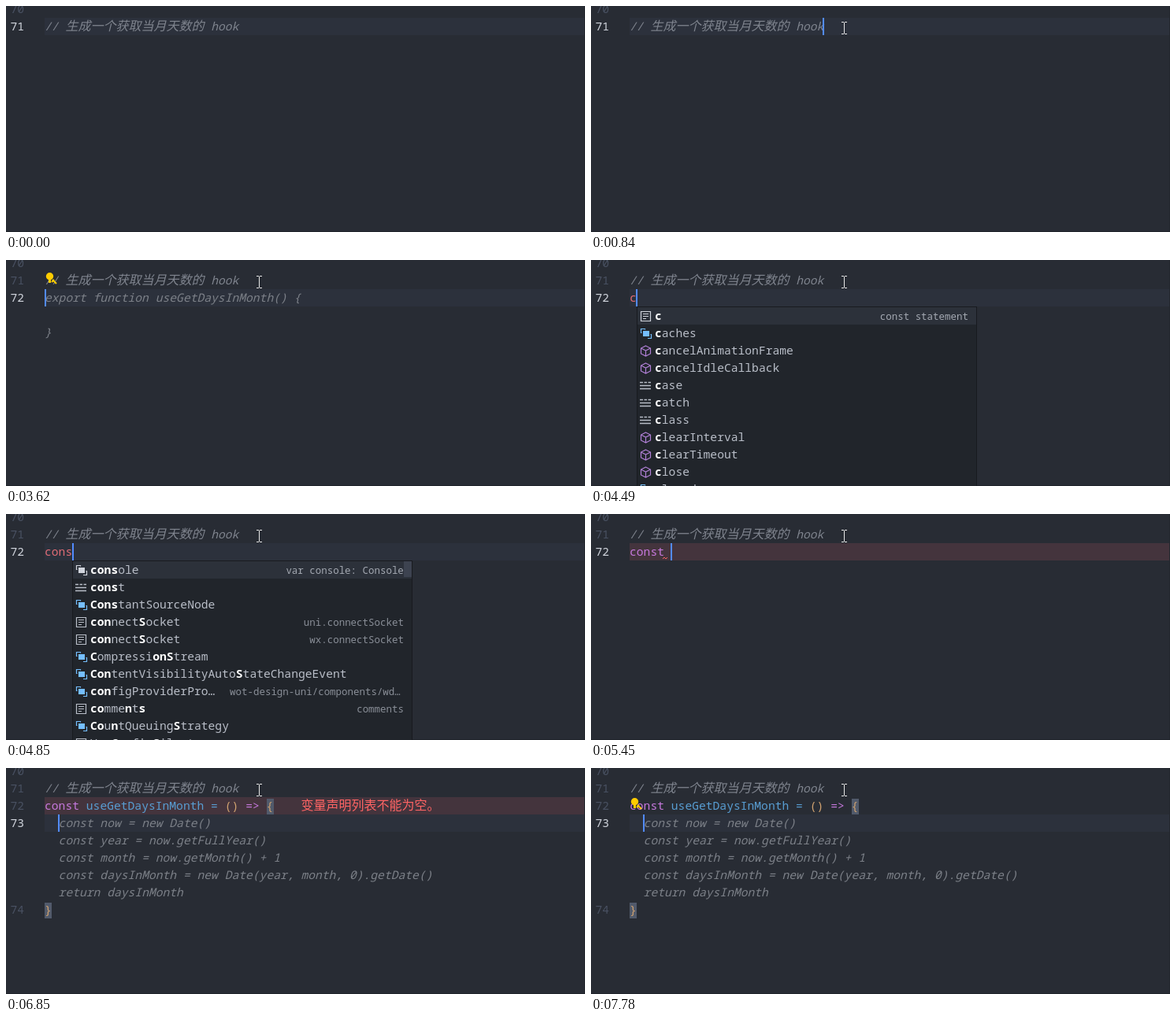
Write an HTML page with a canvas that moves like this. It is 735 by 287 pixels and loops after 8 s.

```html
<!DOCTYPE html>
<html lang="zh">
<head>
<meta charset="utf-8">
<style>
  html, body { margin: 0; width: 100%; height: 100%; overflow: hidden; background: #282c34; }
  canvas { display: block; }
</style>
</head>
<body>
<canvas id="stage" width="735" height="287"></canvas>
<script>
const ctx = document.getElementById('stage').getContext('2d');
const LOOP = 8000, LEFT = 49, ROW = 22, CHAR = 8.8, SIZE = CHAR / 0.6;
const COLOR = {
  bg: '#282c34', line: '#2c313c', error: '#44343d', message: '#ff6464', caret: '#528bff',
  gutter: '#495162', active: '#d0d4dc', comment: '#7f848e', ghost: '#7c8088', text: '#b9bec8',
  red: '#e06c75', purple: '#c678dd', blue: '#589dd2', gold: '#d0a270',
  bracket: '#515a6b', variable: '#75beff', method: '#b180d7', scrollbar: '#3d4350'
};

// Latest value whose start time has been reached.
const at = (steps, t) => steps.findLast(([start]) => t >= start)[1];
const within = (t, from, to) => t >= from && t < to;
const rowTop = n => 15 + (n - 71) * ROW;

const TYPED = [[0, ''], [4420, 'c'], [4570, 'co'], [4710, 'con'], [4780, 'cons'], [4920, 'const'], [5120, 'const ']];
const QUERY = [[0, ''], [4490, 'c'], [4570, 'co'], [4710, 'con'], [4850, 'cons'], [4920, 'const'], [5120, '']];
const CARET_ON = [[690, 1240], [1640, 2170], [2630, 3100], [3620, 4150], [4420, 5650], [6120, 6580], [6780, 7250], [7780, LOOP]];
const POINTER = [
  [70, [527, 207]], [150, [502, 170]], [220, [445, 125]], [300, [372, 82]], [380, [310, 50]],
  [460, [270, 34]], [530, [254, 28]], [610, [275, 25]], [690, [312, 24]], [840, [321, 28]]
];

// Asterisks enclose the letters matched by a fuzzy query.
const C_ITEMS = [
  ['snippet', 'c', 'const statement'], ['variable', 'caches'], ['method', 'cancelAnimationFrame'],
  ['method', 'cancelIdleCallback'], ['keyword', 'case'], ['keyword', 'catch'], ['keyword', 'class'],
  ['method', 'clearInterval'], ['method', 'clearTimeout'], ['method', 'close'], ['variable', 'closed']
];
const CO_ITEMS = [
  ['variable', 'console', 'var console: Console'], ['keyword', 'const'], ['variable', 'ConstantSourceNode'],
  ['snippet', '*con*nect*S*ocket', 'uni.connectSocket'], ['snippet', '*con*nect*S*ocket', 'wx.connectSocket'],
  ['variable', '*C*ompressi*onS*tream'], ['variable', '*Con*tentVisibilityAuto*S*tateChangeEvent'],
  ['variable', '*con*figProviderProps', 'wot-design-uni/components/wd…'], ['snippet', '*co*mme*n*t*s*', 'comments'],
  ['variable', '*Co*u*n*tQueuing*S*trategy'], ['snippet', 'Vue*Con*fig*S*ilent']
];

function rect(x, y, w, h, color) {
  ctx.fillStyle = color;
  ctx.fillRect(x, y, w, h);
}

// Draws Latin and Chinese runs on one baseline and returns the end position.
function text(str, x, baseline, color, style = '', size = SIZE) {
  ctx.fillStyle = color;
  for (const run of str.match(/[\u3000-\u9fff]+|[^\u3000-\u9fff]+/g) || []) {
    const cjk = run.charCodeAt(0) >= 0x3000;
    ctx.font = cjk
      ? `${style} 300 16px "Noto Sans CJK SC", "Noto Sans CJK", sans-serif`
      : `${style} ${size}px "Noto Sans Mono", monospace`;
    ctx.fillText(run, x, baseline);
    x += run.length * (cjk ? 16 : size * 0.6);
  }
  return x;
}

const code = (str, row, color, style, x = LEFT) => text(str, x, rowTop(row) + 16, color, style);
const ghost = (str, row, x) => code(str, row, COLOR.ghost, 'italic', x);

function lineNumber(n, row, active) {
  text(String(n), 5.5, rowTop(row) + 16, active ? COLOR.active : COLOR.gutter, active ? '500' : '');
}

function strokePath(d, x, y, color, width = 1.2) {
  ctx.save();
  ctx.translate(x, y);
  ctx.strokeStyle = color;
  ctx.lineWidth = width;
  ctx.stroke(new Path2D(d));
  ctx.restore();
}

function icon(kind, x, y, selected) {
  const color = selected ? '#d0d4dc' : COLOR[kind] || COLOR.text;
  if (kind === 'variable') {
    rect(x + 4, y + 4, 8, 7, color);
    strokePath('M2.5 6.5H1.5V1.5H6.5V2.5M10 13.5H14.5V8.5H13.5', x, y, color);
  } else if (kind === 'method') {
    strokePath('M7.5 1L13.5 4V11L7.5 14L1.5 11V4ZM1.5 4L7.5 7L13.5 4M7.5 7V14', x, y, color);
  } else if (kind === 'keyword') {
    strokePath('M0 3.5H4M5.5 3.5H9M10.5 3.5H14M0 7.5H14M0 11.5H14', x, y, color, 1.6);
  } else {
    strokePath('M1.5 1.5H13.5V13.5H1.5ZM4 4.5H11M4 7.5H11M4 10.5H8', x, y, color);
  }
}

function popup(query) {
  const x = Math.round(LEFT + query.length * CHAR), top = rowTop(73);
  const fuzzy = new RegExp([...query].join('.*'), 'i');
  const items = query === 'c' ? C_ITEMS : CO_ITEMS;
  rect(x, top, 432, 300, '#181a1f');
  rect(x + 1, top + 1, 430, 300, '#21252b');
  rect(x + 1, top + 1, 430, ROW, '#2c313a');
  if (query !== 'c') rect(x + 421, top + 1, 10, 20, COLOR.scrollbar);
  items.filter(item => fuzzy.test(item[1].replaceAll('*', ''))
    || (item[2] || '').endsWith('…')).forEach(([kind, label, detail = ''], i) => {
    const y = top + 1 + i * ROW, clipped = detail.endsWith('…');
    const shown = clipped ? label.slice(0, -2) + '…' : label;
    const plain = shown.replaceAll('*', '');
    const parts = plain.toLowerCase().startsWith(query)
      ? ['', plain.slice(0, query.length), plain.slice(query.length)]
      : shown.split('*');
    icon(kind, x + 4, y + 4, i === 0);
    parts.reduce((pos, part, k) =>
      text(part, pos, y + 16, k % 2 ? '#ffffff' : COLOR.text, k % 2 ? 'bold' : ''), x + 23);
    const size = SIZE * 0.85, right = x + (clipped ? 417 : 421);
    text(detail, right - detail.length * size * 0.6, y + 16, i ? '#8a8f98' : '#a4a9b2', '', size);
  });
}

function bulb(row) {
  const y = rowTop(row);
  ctx.fillStyle = '#ffcc00';
  ctx.beginPath();
  ctx.arc(55.5, y + 5.7, 4.7, 0, 2 * Math.PI);
  ctx.fill();
  rect(54, y + 9, 3, 5, '#ffcc00');
  strokePath('M59 10L64 15M58 13L61 10', 0, y, '#ffcc00', 2);
}

function pointer([x, y]) {
  for (const dy of [-8, 7]) {
    rect(x - 3, y + dy, 3, 1, '#e8e8e8');
    rect(x + 1, y + dy, 3, 1, '#e8e8e8');
  }
  rect(x, y - 7, 1, 14, '#e8e8e8');
}

function acceptedCode(t) {
  const last = t < 6850 ? 74 : 78;
  rect(331, rowTop(72) + 2, 9, 20, COLOR.bracket);
  rect(LEFT, rowTop(last) + 2, 9, 20, COLOR.bracket);
  [['const ', COLOR.purple], ['useGetDaysInMonth = ', COLOR.blue],
   ['() ', COLOR.gold], ['=> ', COLOR.purple], ['{', COLOR.gold]]
    .reduce((x, [str, color]) => code(str, 72, color, '', x), LEFT);
  code('}', last, COLOR.gold);
  lineNumber(72, 72);
  lineNumber(73, 73, true);
  lineNumber(74, last);
  if (t >= 6850) {
    ['const now = new Date()', 'const year = now.getFullYear()', 'const month = now.getMonth() + 1',
     'const daysInMonth = new Date(year, month, 0).getDate()', 'return daysInMonth']
      .forEach((str, i) => ghost(str, 73 + i, LEFT + 2 * CHAR));
  }
}

function typedCode(t, typed) {
  lineNumber(72, 72, true);
  const end = code(typed, 72, typed.startsWith('const') ? COLOR.purple : COLOR.red);
  const suggestion = within(t, 2170, 4420) ? 'export function useGetDaysInMonth() {'
    : t >= 6050 ? 'useGetDaysInMonth = () => {' : '';
  if (suggestion) {
    ghost(suggestion, 72, end);
    ghost('}', 74);
  }
  if (t >= 5450) strokePath('M91 20l2 -2l2 2l2 -2', 0, rowTop(72), COLOR.message, 1);
}

function draw(t) {
  const accepted = t >= 6780, typed = at(TYPED, t), query = at(QUERY, t);
  const activeRow = accepted ? 73 : t >= 1640 ? 72 : 71;

  rect(0, 0, 735, 287, COLOR.bg);
  rect(LEFT, rowTop(activeRow), 686, ROW, COLOR.line);
  if (within(t, 5450, 7180)) rect(LEFT, rowTop(72), 686, ROW, COLOR.error);
  rect(734, 0, 1, 287, '#23272e');
  rect(0, 286, 735, 1, '#20242b');

  lineNumber(70, 70);
  lineNumber(71, 71, activeRow === 71);
  code('// 生成一个获取当月天数的 hook', 71, COLOR.comment, 'italic');

  if (accepted) acceptedCode(t);
  else if (t >= 1640) typedCode(t, typed);
  if (within(t, 5520, 7180)) {
    code('变量声明列表不能为空。', 72, COLOR.message, '', LEFT + (t < 6050 ? 10 : 37) * CHAR);
  }

  if (within(t, 2370, 4420)) bulb(71);
  if (t >= 7450) bulb(72);
  if (query) popup(query);
  if (CARET_ON.some(([from, to]) => within(t, from, to))) {
    const column = accepted ? 2 : typed.length;
    rect(activeRow === 71 ? 294 : Math.floor(LEFT + column * CHAR), rowTop(activeRow), 2, ROW, COLOR.caret);
  }
  if (t >= 70) pointer(at(POINTER, t));
}

function tick() {
  draw(performance.now() % LOOP);
  requestAnimationFrame(tick);
}
tick();
</script>
</body>
</html>
```
